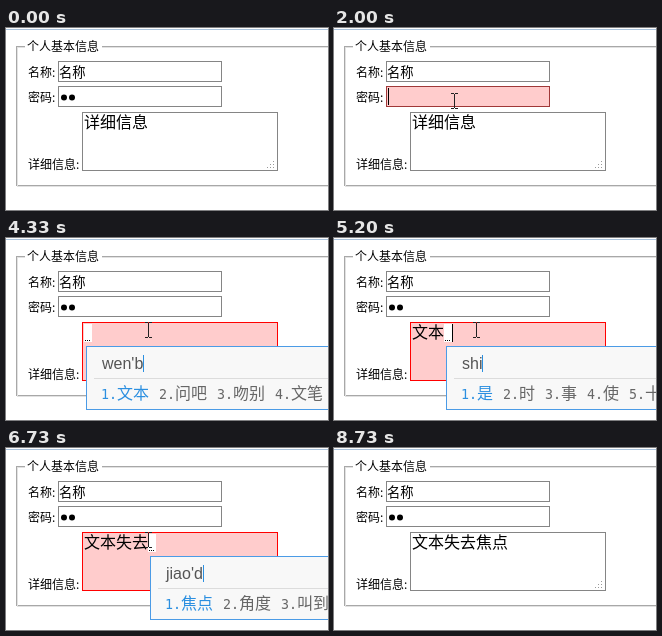
These frames come from a looping animation (322x182 px, 8930 ms). An HTML page with a canvas:

```html
<!DOCTYPE html>
<html lang="zh-CN">
<head>
<meta charset="utf-8">
<style>
html, body { margin: 0; width: 100%; height: 100%; overflow: hidden; background: #fff; }
canvas { display: block; width: 322px; height: 182px; }
</style>
</head>
<body>
<canvas id="stage" width="322" height="182"></canvas>
<script>
const ctx = document.getElementById('stage').getContext('2d');
const LOOP = 8930, STEP = 1000 / 15;
const CJK = '"Noto Sans CJK SC", "Noto Sans CJK", sans-serif';
const LATIN = '"Liberation Sans", sans-serif';
const MONO = '"DejaVu Sans Mono", monospace';
const BLUE = '#2b8fe0';

// start time, committed text, typed pinyin, candidates
const typing = [
  [2530, '', '', ''],
  [3800, '', 'w', '我 为 无 问 完'],
  [3870, '', 'we', '为 位 未 微 问'],
  [3930, '', 'wen', '问 文 闻 稳 温'],
  [4130, '', "wen'b", '文本 问吧 吻别 文笔'],
  [4730, '文本', '', ''],
  [5070, '文本', 's', '是 上 说 三 时'],
  [5130, '文本', 'sh', '是 上 说 时 神'],
  [5200, '文本', 'shi', '是 时 事 使 十'],
  [5670, '文本', "shi'q", '失去 时期 事情 石器'],
  [5730, '文本', "shi'qu", '失去 时区 市区 拾取'],
  [5870, '文本失去', '', ''],
  [6000, '文本失去', 'j', '就 加 及 将'],
  [6070, '文本失去', 'ji', '及 几 级 机'],
  [6130, '文本失去', 'jia', '加 家 价 假'],
  [6270, '文本失去', 'jiao', '叫 教 交 脚'],
  [6730, '文本失去', "jiao'd", '焦点 角度 叫到'],
  [6870, '文本失去', "jiao'di", '焦点 交底 较低'],
  [6930, '文本失去', "jiao'dian", '焦点 交点 郊甸'],
  [7470, '文本失去焦点', '', '']
];
const caretOff = [[1730, 1800], [2330, 2530], [3070, 3600], [4330, 4730],
                  [5670, 5870], [6530, 7070], [8000, 8530]];
// start, step count, from x, from top, to x, to top
const moves = [
  [400, 1, 157, 116, 157, 116],
  [600, 7, 157, 116, 117, 42],
  [1400, 6, 117, 42, 117, 63],
  [2000, 5, 117, 63, 142, 84],
  [7670, 1, 142, 87, 142, 87],
  [8000, 1, 142, 129, 142, 129]
];

const latest = (list, t) => list.filter(item => item[0] <= t).pop();

function rect(x, y, w, h, color) {
  ctx.fillStyle = color;
  ctx.fillRect(x, y, w, h);
}

function text(str, x, y, size, color = '#000', family = CJK) {
  ctx.font = `${size}px ${family}`;
  ctx.fillStyle = color;
  ctx.fillText(str, x, y);
}

function field(x, y, w, h, focused, border = '#a03838') {
  rect(x, y, w, h, focused ? border : '#858585');
  rect(x + 1, y + 1, w - 2, h - 2, focused ? '#fcc' : '#fff');
}

function drawForm(focus) {
  rect(0, 0, 322, 182, '#fff');
  rect(0, 1, 322, 1, '#a9c2dc');

  // Grooved frame with a gap for the legend
  for (const [offset, color] of [[0, '#a8a8a8'], [1, '#e2e2e2']]) {
    rect(10 + offset, 18 + offset, 1, 140 - offset, color);
    rect(10 + offset, 18 + offset, 312, 1, color);
    rect(10 + offset, 157 + offset, 312, 1, color);
  }
  rect(19, 16, 77, 6, '#fff');
  text('个人基本信息', 21, 23, 12);
  text('名称:', 22, 49, 12);
  text('密码:', 22, 74, 12);
  text('详细信息:', 22, 141, 12);

  field(52, 33, 164, 21, focus === 'name');
  field(52, 58, 164, 21, focus === 'password');
  field(76, 84, 196, 59, focus === 'details', '#f00');

  if (focus !== 'name') text('名称', 53, 49, 13.33);
  if (focus !== 'password') {
    ctx.fillStyle = '#000';
    for (const x of [58, 66]) {
      ctx.beginPath();
      ctx.arc(x, 69.5, 3, 0, 7);
      ctx.fill();
    }
  }
  for (let row = 0; row < 3; row++)
    for (let col = 2 - row; col < 3; col++) {
      const x = 261 + col * 3, y = 133 + row * 3;
      rect(x + 1, y + 1, 1, 1, '#fff');
      rect(x, y, 1, 1, '#999');
    }
}

function drawCursor(t) {
  if (t < 400 || t >= 8070) return;
  const [start, steps, x0, y0, x1, y1] = latest(moves, t);
  const p = Math.min(1, (Math.floor((t - start + 5) / STEP) + 1) / steps);
  const ease = p * p * (3 - 2 * p);
  const x = Math.round(x0 + (x1 - x0) * ease);
  const y = Math.round(y0 + (y1 - y0) * ease);
  rect(x, y + 1, 1, 14, '#222');
  for (const end of [y, y + 15]) {
    rect(x - 3, end, 3, 1, '#222');
    rect(x + 1, end, 3, 1, '#222');
  }
}

function drawInputMethod(x, pinyin, candidates) {
  rect(x, 108, 322 - x, 64, '#4b9be6');
  rect(x + 1, 109, 322 - x, 62, '#f8f8f8');
  rect(x + 8, 140, 322 - x, 1, '#dcdcdc');
  text(pinyin, x + 16, 131, 16, '#555', LATIN);
  rect(Math.round(x + 16 + ctx.measureText(pinyin).width), 117, 1, 17, BLUE);

  let left = x + 15;
  candidates.split(' ').forEach((word, i) => {
    const color = i ? '#666' : BLUE;
    text(`${i + 1}.`, left, 161, 13.3, color, MONO);
    text(word, left + 16, 161, 16, color);
    left += 26 + word.length * 16;
    if (pinyin === 'j' && i === 0) {
      rect(left - 9, 149, 8, 8, '#5aa9e8');
      rect(left - 7, 152.5, 4, 1, '#fff');
      rect(left - 5.5, 151, 1, 4, '#fff');
      left += 9;
    }
  });
}

function draw(t) {
  const focus = t < 1200 ? '' : t < 1800 ? 'name' : t < 2530 ? 'password' : t < 8730 ? 'details' : '';
  const [, words, pinyin, candidates] = latest(typing, t) || [0, '详细信息', '', ''];
  const end = 78 + words.length * 16;
  drawForm(focus);
  text(words, 78, 100, 16);
  if (pinyin) {
    rect(end, 86, 8, 18, '#fff');
    for (let i = 0; i < 3; i++) rect(end + 1 + i * 2, 102, 1, 1, '#000');
  }
  if (focus && !caretOff.some(([from, to]) => t >= from && t < to)) {
    if (focus === 'details') rect(end + (pinyin ? 8 : 0), 86, 1, 18, '#000');
    else rect(54, focus === 'name' ? 35 : 60, 1, 17, '#000');
  }
  drawCursor(t);
  if (pinyin) drawInputMethod(80 + words.length * 16, pinyin, candidates);
}

const began = performance.now();
function tick() {
  draw((performance.now() - began) % LOOP);
  requestAnimationFrame(tick);
}
tick();
</script>
</body>
</html>
```
